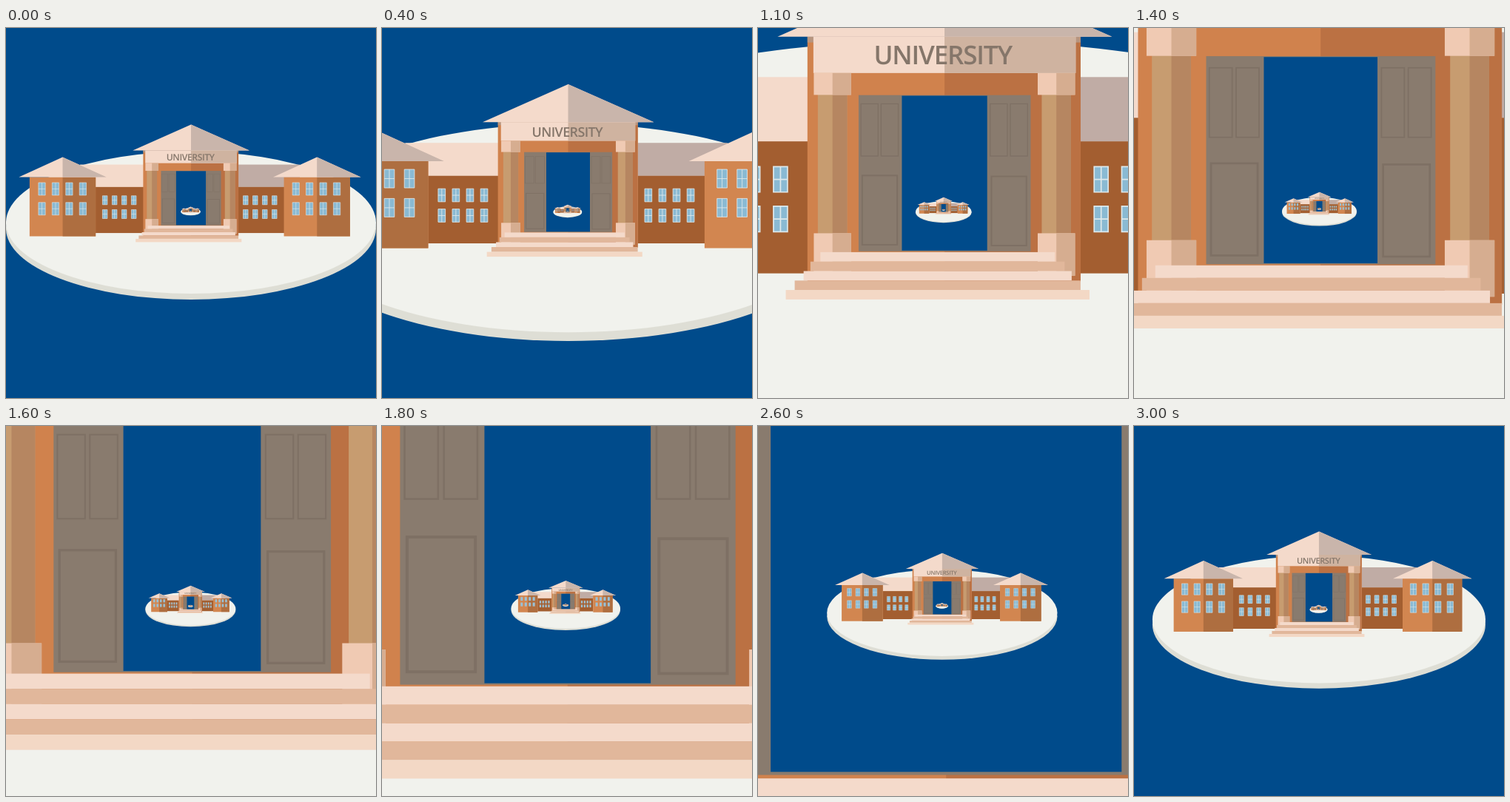
These frames come from a looping animation (500x500 px, 3100 ms). An HTML page:

```html
<!DOCTYPE html>
<html lang="en">
<head>
<meta charset="utf-8">
<title>Endless campus</title>
<style>
html, body { margin: 0; width: 100%; height: 100%; overflow: hidden; background: #004b8b; }
svg { display: block; width: 100%; height: 100%; }
text { font: 600 12.2px "Open Sans", "Noto Sans", sans-serif; letter-spacing: -.4px; text-rendering: geometricPrecision; }
</style>
</head>
<body>
<svg id="stage" viewBox="0 0 500 500"></svg>
<script>
const SKY = '#004b8b', PINK = '#f4dacb', SHADE = '#c9b5ab', TAN = '#e1b79b', GREY = '#897b6e';
const LOOP = 3100, STEP = 100, RATIO = 18.95, LEVELS = 4;
const PIVOT = [249.52, 247.24];

// Rectangles and polygons are given by their edges, not by sizes.
const box = (x1, y1, x2, y2, fill) =>
  `<rect x="${x1}" y="${y1}" width="${x2 - x1}" height="${y2 - y1}" fill="${fill}"/>`;
const poly = (points, fill) => `<polygon points="${points}" fill="${fill}"/>`;
const disc = (cy, fill) => `<ellipse cx="250" cy="${cy}" rx="250" ry="96" fill="${fill}"/>`;

function panes(x0, gap, w, h, rows) {
  let d = '';
  for (const y of rows) {
    for (let i = 0; i < 4; i++) {
      const x = x0 + gap * i;
      d += `M${x} ${y}h${w}v${h}h${-w}zM${x + w / 2} ${y}v${h}M${x} ${y + h / 2}h${w}`;
    }
  }
  return `<path d="${d}" fill="#8abad3" stroke="#dde8ea" stroke-width=".6"/>`;
}

function roof(left, mid, right, top, base) {
  return poly(`${left},${base} ${mid},${top} ${right},${base}`, PINK) +
    poly(`${mid},${top} ${right},${base} ${mid},${base}`, SHADE);
}

function tower(x, windowX) {
  return box(x, 201.5, x + 89.3, 281.5, '#d28650') +
    box(x + 44.7, 201.5, x + 89.3, 281.5, '#ae6e40') +
    panes(windowX, 18.45, 9.3, 17, [209, 235.8]) +
    roof(x - 14.5, x + 44.6, x + 103.9, 174.5, 201.5);
}

function wing(x1, x2, roofX1, roofX2, roofFill, windowX) {
  return box(roofX1, 184.6, roofX2, 215, roofFill) +
    box(x1, 214.9, x2, 277.1, '#a35e30') +
    panes(windowX, 13, 6.6, 12, [226.8, 245.5]);
}

function column(x) {
  const mid = x + 8.8;
  const pair = (inset, y1, y2, light, dark) =>
    box(x + inset, y1, x + 17.6 - inset, y2, light) + box(mid, y1, x + 17.6 - inset, y2, dark);
  return pair(1.9, 192, 259, '#c79c70', '#b68661') +
    pair(0, 182.7, 193, '#f0cab3', '#d6ad90') +
    pair(0, 258.2, 278.2, '#f0cab3', '#d6ad90');
}

function door(x, drop) {
  const mould = (x1, y1, x2, y2, w) =>
    `<rect x="${x + x1}" y="${y1}" width="${x2 - x1}" height="${y2 - y1}" fill="none" stroke="#7e7064" stroke-width="${w}"/>`;
  return mould(1.1, 197.2, 9.2, 221.8, .45) + mould(10.6, 197.2, 18.7, 221.8, .45) +
    mould(1.7, 231 + drop, 18.2, 263.6 + drop, .7);
}

function steps() {
  const edges = [[191.5, 302], [186.8, 306.6], [183.6, 309.9], [179.4, 314.1], [175.2, 318.3]];
  return edges.map(([x1, x2], i) =>
    box(x1, 267.1 + 4.46 * i, x2, 271.56 + 4.46 * i, i % 2 ? TAN : i === 4 ? '#f3d8c5' : PINK)).join('');
}

function hall() {
  return box(185.4, 165.5, 314.1, 281, '#d0824d') +
    box(250, 165.5, 314.1, 281, '#bb7143') +
    box(185.4, 165.5, 314.1, 168.3, '#b7957f') +
    box(188.2, 165.5, 311.8, 182.7, PINK) +
    box(250, 165.5, 311.8, 182.7, '#cfb3a0') +
    column(188.4) + column(293.9) +
    box(209.5, 193.1, 290.6, 266.7, GREY) +
    door(209.5, 0) + door(270.4, .4) +
    box(229.9, 193.4, 270.1, 266.35, SKY) +
    steps() +
    roof(171.3, 250, 328.9, 130.6, 165.6) +
    `<text x="249.2" y="178.7" text-anchor="middle" fill="#85766a">UNIVERSITY</text>`;
}

const campus = disc(271, '#deded5') + disc(263, '#f1f2ed') +
  wing(121, 186, 100, 186, PINK, 130.4) +
  wing(314, 376, 314, 397, '#c0aca5', 320.5) +
  tower(31.9, 43.9) + tower(375.6, 387.1) + hall();

const stage = document.getElementById('stage');
stage.innerHTML = box(0, 0, 500, 500, SKY) + `<g>${campus}</g>`.repeat(LEVELS);
const levels = [...stage.querySelectorAll('g')];

// time step, zoom, centre x, centre y, centre y of the nested copies, their height factor
const KEYS = [
  [0, 1, 249.5, 247.2, 247.3, .96],
  [4, 1.468, 250.8, 247.2, 247.3, .96],
  [8, 2.153, 251, 247, 247.1, .96],
  [14, 3.82, 250.4, 244.9, 244.4, .96],
  [18, 5.59, 248.1, 240.8, 242, .962],
  [22, 8.16, 247.6, 236.8, 238.4, .962],
  [30, 17.055, 249.5, 247.1, 247.2, .997],
];

function pose(n) {
  const i = Math.max(1, KEYS.findIndex(k => k[0] >= n));
  const a = KEYS[i - 1], b = KEYS[i];
  const p = (n - a[0]) / (b[0] - a[0]);
  const mix = j => a[j] + (b[j] - a[j]) * p;
  return { zoom: a[1] * (b[1] / a[1]) ** p, x: mix(2), y: mix(3), innerY: mix(4), squash: mix(5) };
}

function draw(ms) {
  const { zoom, x, y, innerY, squash } = pose(Math.floor(ms % LOOP / STEP));
  levels.forEach((g, i) => {
    const s = zoom / RATIO ** i;
    const sy = i ? s * squash : s;
    g.setAttribute('transform',
      `translate(${x} ${i ? innerY : y}) scale(${s} ${sy}) translate(${-PIVOT[0]} ${-PIVOT[1]})`);
  });
}

const start = performance.now();
function tick() {
  draw(performance.now() - start);
  requestAnimationFrame(tick);
}
tick();
</script>
</body>
</html>
```
